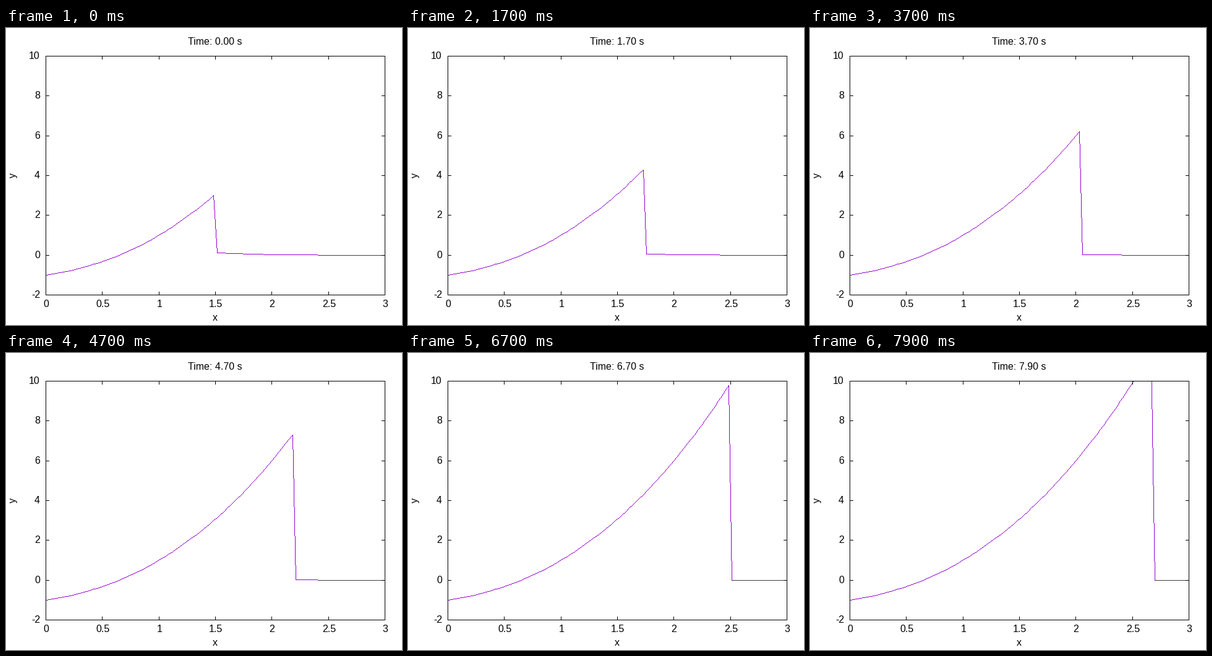
Animation, 640 px wide and 480 px high, one loop 8 s. Source, as a matplotlib script:

```python
import numpy as np
import matplotlib.pyplot as plt
from matplotlib.animation import FuncAnimation
from matplotlib.collections import PolyCollection
from matplotlib.patches import Rectangle

W, H, DPI = 640, 480, 80
LEFT, RIGHT, TOP, BOTTOM = 64, 612, 45, 431
FRAMES, STEP = 80, 100
PURPLE, GREY = (148 / 255, 0, 211 / 255, 1), (0.25, 0.25, 0.25, 1)

plt.rcParams["font.family"] = "Liberation Sans"
plt.rcParams["font.size"] = 16 * 72 / DPI

fig = plt.figure(figsize=(W / DPI, H / DPI), dpi=DPI, facecolor="white")
ax = fig.add_axes([0, 0, 1, 1])
ax.set_xlim(0, W)
ax.set_ylim(H, 0)
ax.axis("off")


def col(x):
    return np.floor(LEFT + x / 3 * (RIGHT - LEFT) + 0.5)


def row(y):
    return BOTTOM - np.floor((y + 2) / 12 * (BOTTOM - TOP) + 0.5)


def bar(x0, y0, x1, y1):
    """Black run of whole pixels, both ends included."""
    ax.add_patch(Rectangle((x0, y0), x1 - x0 + 1, y1 - y0 + 1, fc="black",
                           lw=0, antialiased=False, zorder=3))


def label(x, y, s, ha="left", **kw):
    return ax.text(x, y, s, ha=ha, va="baseline", color="black", **kw)


# Frame, ticks and labels
for y in (TOP, BOTTOM):
    bar(LEFT, y, RIGHT, y)
for x in (LEFT, RIGHT):
    bar(x, TOP, x, BOTTOM)
for v in range(-2, 11, 2):
    y = row(v)
    bar(LEFT, y, LEFT + 5, y)
    bar(RIGHT - 5, y, RIGHT, y)
    label(55, y + 5, str(v), "right")
for v in np.arange(0, 3.1, 0.5):
    x = col(v)
    bar(x, TOP, x, TOP + 5)
    bar(x, BOTTOM - 5, x, BOTTOM)
    label(x + 1, 451, f"{v:g}", "center")
label(338, 473, "x", "center")
ax.text(16, 238, "y", rotation=90, rotation_mode="anchor",
        ha="center", va="baseline", color="black")
title = label(294, 27, "")

X = np.linspace(0, 3, 100)
RISE = 0.15 * X**3 + 1.05 * X**2 + 0.8 * X - 1
TAIL = np.exp(-0.9 * X**2)
UNIT = np.array([[0, 0], [1, 0], [1, 1], [0, 1]])

curve = PolyCollection([], linewidths=0, antialiaseds=False, zorder=2)
ax.add_collection(curve, autolim=False)


def trace(xs, ys):
    """Hard-edged pixels along a polyline."""
    parts = []
    for x0, y0, x1, y1 in zip(xs, ys, xs[1:], ys[1:]):
        n = int(max(abs(x1 - x0), abs(y1 - y0)))
        s = np.linspace(0, 1, n + 1)
        parts.append(np.column_stack((x0 + s * (x1 - x0), y0 + s * (y1 - y0))))
    pix = np.unique(np.floor(np.vstack(parts) + 0.5), axis=0)
    return pix[pix[:, 1] >= TOP]


def update(i):
    t = i * STEP / 1000
    front = 1.5 + 0.15 * t
    pix = trace(col(X), row(np.where(X < front, RISE, TAIL)))
    flat = (pix[:, 1] == row(0)) & (pix[:, 0] >= 504)
    curve.set_verts(pix[:, None, :] + UNIT)
    curve.set_facecolor(np.where(flat[:, None], GREY, PURPLE))
    title.set_text(f"Time: {t:.2f} s")
    return curve, title


anim = FuncAnimation(fig, update, frames=FRAMES, interval=STEP,
                     repeat=True, repeat_delay=0)
plt.show()
```
